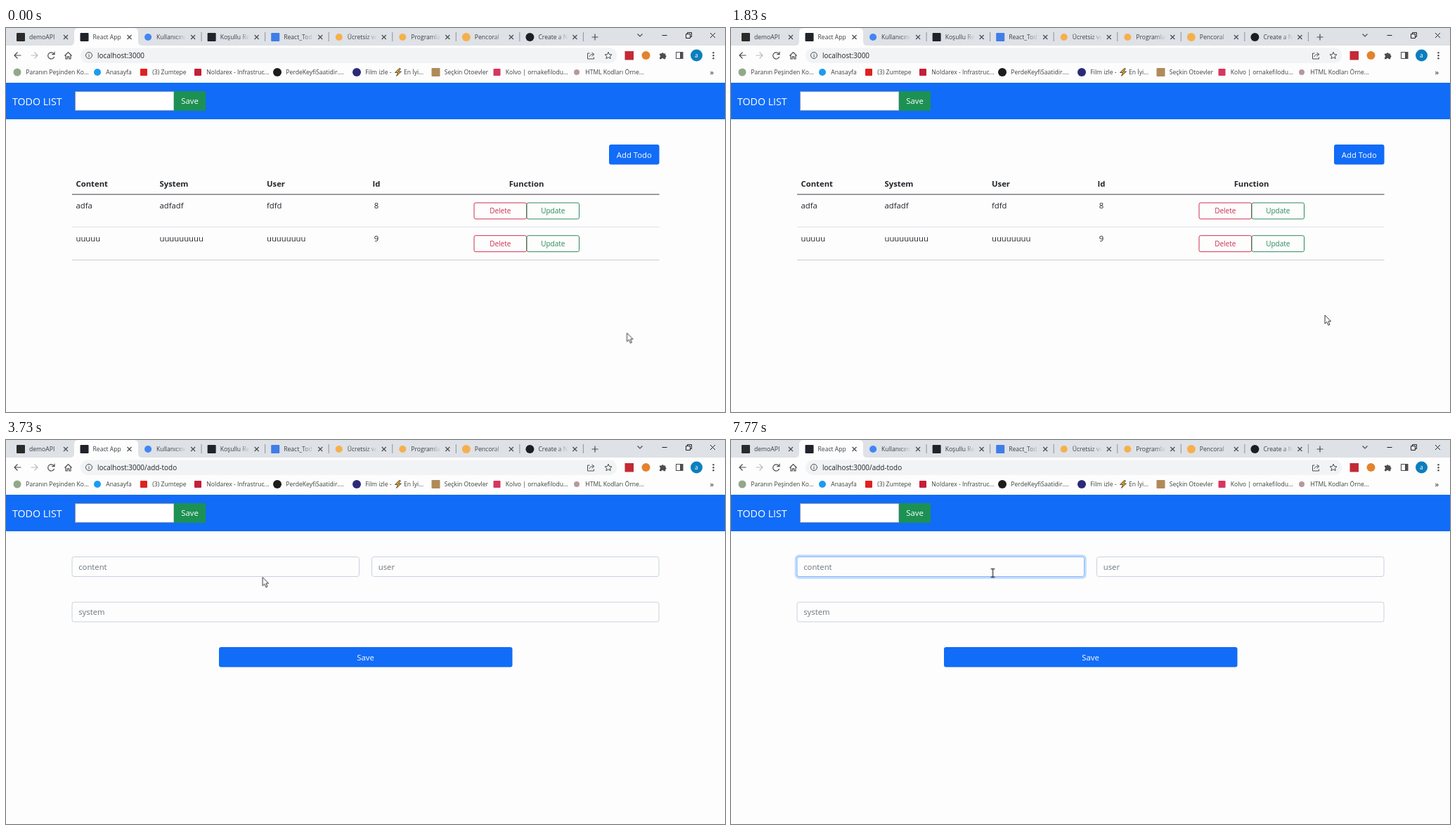
These frames come from a looping animation (1023x547 px, 8000 ms). An HTML page:

```html
<!DOCTYPE html>
<html lang="tr">
<head>
<meta charset="utf-8">
<title>React App</title>
<style>
  html, body { margin: 0; width: 100%; height: 100%; overflow: hidden; background: #fdfdfd; }
  svg { display: block; width: 1023px; height: 547px; font-family: "Open Sans", "Noto Sans", sans-serif; font-size: 11.3px; fill: #212529; }
  .small { font-size: 8.6px; fill: #3c4043; }
  .url { font-size: 9.95px; }
  .line { fill: none; stroke: #4a4d51; stroke-width: 1.2; }
  .mid { text-anchor: middle; }
  .white { fill: #fff; }
  .blue { fill: #116cf8; }
  .bold { font-weight: 700; }
  .field { fill: #fdfdfd; stroke: #c9d1e0; }
  .hint { fill: #6c757d; }
  .btn { font-size: 10px; }

  .loop, .loop * { animation: 8s infinite step-end; }
  #list, #home { animation-name: list; }
  #form, #addUrl { animation-name: form; visibility: hidden; }
  #hover { animation-name: hover; animation-timing-function: linear; opacity: 0; }
  #focus { animation-name: focus; animation-timing-function: ease-in-out; opacity: 0; }
  #caret { animation-name: caret; opacity: 0; }
  #cursor { animation-name: move; animation-timing-function: linear; }
  #arrow { animation-name: arrow; }
  #hand { animation-name: hand; opacity: 0; }
  #beam { animation-name: beam; opacity: 0; }

  @keyframes list { 0% { visibility: visible } 32.5%, 100% { visibility: hidden } }
  @keyframes form { 0% { visibility: hidden } 32.5%, 100% { visibility: visible } }
  @keyframes hover { 0%, 29.375% { opacity: 0 } 31.25%, 100% { opacity: 1 } }
  @keyframes focus { 0%, 51.125% { opacity: 0 } 53%, 100% { opacity: 1 } }
  @keyframes caret {
    0%, 57.5%, 70.5%, 83.375%, 96.75%, 100% { opacity: 0 }
    51.125%, 63.75%, 77.5%, 90% { opacity: 1 }
  }
  @keyframes arrow { 0%, 39.25% { opacity: 1 } 29.375%, 46.75%, 100% { opacity: 0 } }
  @keyframes hand { 0%, 32.5%, 100% { opacity: 0 } 29.375% { opacity: 1 } }
  @keyframes beam { 0%, 39.25% { opacity: 0 } 32.5%, 46.75%, 100% { opacity: 1 } }
  @keyframes move {
    0% { transform: translate(883.5px, 434.5px) }
    12.875%, 18.75% { transform: translate(882.5px, 434.5px) }
    20.5% { transform: translate(882.5px, 440px) }
    22.875% { transform: translate(845px, 409.5px) }
    25% { transform: translate(838px, 330px) }
    27.5% { transform: translate(868px, 225px) }
    30% { transform: translate(894px, 187px) }
    31.5%, 36.625% { transform: translate(897px, 185px) }
    38.75% { transform: translate(860px, 190px) }
    41.25% { transform: translate(700px, 215px) }
    43.75% { transform: translate(480px, 228px) }
    46.625% { transform: translate(365px, 195.5px) }
    48.25%, 100% { transform: translate(372.5px, 189.5px) }
  }
</style>
</head>
<body>
<svg viewBox="0 0 1023 547">
  <defs>
    <linearGradient id="fade">
      <stop offset="0" stop-color="#dee1e6" stop-opacity="0"/>
      <stop offset=".75" stop-color="#dee1e6"/>
    </linearGradient>
  </defs>

  <!-- browser frame -->
  <path fill="#dee1e6" d="M0 0H1023V25H0z"/>
  <path fill="#fdfdfd" d="M0 25H1023V78H0z"/>
  <path fill="#fdfdfd" d="M91 25Q97 25 97 19V6Q97 0 103 0H182Q188 0 188 6V19Q188 25 194 25z"/>
  <g id="tabs"></g>
  <path class="line" d="M833.5 13H842.5M838 8.5V17.5M898.5 8.5L902 12L905.500 8.500"/>
  <path class="line" style="stroke:#222;stroke-width:1" d="M933.500 10.500H940.500M967.500 8.500H973.500V14.500H967.500zM969.500 8V6.500H975.500V12.500H974M1002 7L1009 14M1009 7L1002 14"/>

  <!-- toolbar -->
  <rect x="106" y="28.500" width="763" height="21.500" rx="10.750" fill="#f1f3f4"/>
  <path class="line" d="M21.500 39H12M16.500 34.500L12 39L16.500 43.500M68.200 37A4.600 4.600 0 1 0 68.600 41M69 33.800V37.600H65.200M83.500 39.500L88.500 34.500L93.500 39.500M85 38.500V44H87.300V40.800H89.700V44H92V38.500"/>
  <path class="line" style="stroke:#b9bcc0" d="M35.500 39H45M40.500 34.500L45 39L40.500 43.500"/>
  <g class="line" style="stroke-width:1">
    <circle cx="118" cy="39" r="4.500"/>
    <path d="M118 38.300V41.500M118 36.500V37.500"/>
    <path d="M830.500 36H827.500V44H836.500V41.500M830 41Q830.500 37.500 835.500 37.500M833.500 35L837 37.500L833.500 40.300"/>
    <path d="M857 34.300L858.400 37.600L862 37.900L859.300 40.200L860.100 43.700L857 41.800L853.900 43.700L854.700 40.200L852 37.900L855.600 37.600z"/>
    <rect x="953.500" y="34.500" width="9.500" height="9"/>
  </g>
  <path fill="#4a4d51" d="M959 34.500H963V43.500H959zM930 36.500H932.500A1.700 1.700 0 0 1 935.800 36.500H938.300V38.800A1.700 1.700 0 0 1 938.300 42V44.300H935.700A1.600 1.600 0 0 0 932.600 44.300H930V41.800A1.600 1.600 0 0 0 930 38.800z"/>
  <rect x="880.500" y="33" width="12.500" height="12.500" fill="#c22a35"/>
  <circle cx="910.500" cy="39" r="6" fill="#e5822b"/>
  <circle cx="982.500" cy="39" r="8.500" fill="#0b7fbd"/>
  <text class="small mid" style="fill:#fff" x="982.500" y="42">a</text>
  <g fill="#4a4d51"><circle cx="1006.500" cy="35.200" r="1.200"/><circle cx="1006.500" cy="39.200" r="1.200"/><circle cx="1006.500" cy="43.200" r="1.200"/></g>
  <g class="loop url">
    <text id="home" x="130" y="42.800">localhost:3000</text>
    <text id="addUrl" x="130" y="42.800">localhost:3000/add-todo</text>
  </g>
  <g id="marks"></g>
  <path fill="#e8a021" stroke="#333" stroke-width=".8" d="M559.500 57.500L553.500 63.500H557.500L555.500 68.500L562.500 62H558.500L561.500 58z"/>
  <text x="1001.500" y="66.500">»</text>

  <!-- navigation bar -->
  <path class="blue" d="M0 78H1023V130H0z"/>
  <text class="white" style="font-size:14.2px" x="9" y="109.500">TODO LIST</text>
  <rect class="white" x="98.500" y="90.500" width="140.500" height="27" stroke="#8b98ad"/>
  <path fill="#1d9153" d="M239 90H283Q284 90 284 91V117Q284 118 283 118H239z"/>
  <text class="white mid" x="261.500" y="108.300">Save</text>

  <g class="loop">
    <g id="list">
      <rect class="blue" x="858" y="166" width="71.500" height="28.500" rx="3"/>
      <rect id="hover" fill="#0b5ed7" x="858" y="166" width="71.500" height="28.500" rx="3"/>
      <text class="white mid" x="893.800" y="184.600">Add Todo</text>
      <g class="bold">
        <text x="99.500" y="226.300">Content</text>
        <text x="218.500" y="226.300">System</text>
        <text x="371" y="226.300">User</text>
        <text class="mid" x="527" y="226.300">Id</text>
        <text class="mid" x="740.500" y="226.300">Function</text>
      </g>
      <path stroke="#3a3d48" d="M94 237H929.500"/>
      <path stroke="#dfe3ea" d="M94 283.500H929.500"/>
      <path stroke="#c9ccd2" d="M94 330.500H929.500"/>
      <g id="rows"></g>
    </g>
    <g id="form">
      <rect class="field" x="94" y="166.500" width="408.500" height="28" rx="3"/>
      <g id="focus">
        <rect x="92.250" y="164.750" width="412" height="31.500" rx="4.500" fill="none" stroke="#c2dbfe" stroke-width="3"/>
        <rect x="94" y="166.500" width="408.500" height="28" rx="3" fill="#fdfdfd" stroke="#86b7fe"/>
      </g>
      <rect class="field" x="520.500" y="166.500" width="408.500" height="28" rx="3"/>
      <rect class="field" x="94" y="231" width="835" height="28" rx="3"/>
      <g class="hint">
        <text x="103.200" y="184.800">content</text>
        <text x="529.800" y="184.800">user</text>
        <text x="103.200" y="249.300">system</text>
      </g>
      <path id="caret" stroke="#222" d="M104 174V188"/>
      <rect class="blue" x="303" y="295" width="417.500" height="28.500" rx="3"/>
      <text class="white mid" x="511.500" y="313.800">Save</text>
    </g>
    <g id="cursor" stroke="#222" stroke-width=".9">
      <path id="arrow" class="white" d="M0 0V12.200L2.800 9.600L4.900 14.300L6.900 13.400L4.900 8.800H8.600z"/>
      <path id="hand" class="white" d="M-1 0Q0-1.200 1 0V5Q3 4.400 3.500 5.700Q5.200 5.200 5.800 6.500Q7.800 6.300 7.800 8V11L6.500 15H0L-4 9.500Q-4 7.700-2.500 8.300L-1 9.800z"/>
      <path id="beam" fill="none" stroke-width="1.200" d="M-2.800-5.800H2.800M0-5.800V5.800M-2.800 5.800H2.800"/>
    </g>
  </g>
</svg>
<script>
  const fill = (id, html) => { document.getElementById(id).innerHTML = html; };
  const text = (x, y, s, cls = '') => `<text class="${cls}" x="${x}" y="${y}">${s}</text>`;
  const square = (x, y, r, color) =>
    `<rect x="${x - r}" y="${y - r}" width="${2 * r}" height="${2 * r}" rx="1" fill="${color}"/>`;
  const circle = (x, y, r, color) => `<circle cx="${x}" cy="${y}" r="${r}" fill="${color}"/>`;

  const tabs = [
    ['demoAPI', square, '#2b2b2b', 6],
    ['React App', square, '#20232a', 6],
    ['Kullanıcını', circle, '#4285f4', 5],
    ['Koşullu Re', square, '#20232a', 6],
    ['React_Tod', square, '#3f7de8', 6],
    ['Ücretsiz ve', circle, '#f5b04c', 5],
    ['Programla', circle, '#f5b04c', 5],
    ['Pencoral', circle, '#f5b04c', 6],
    ['Create a N', circle, '#1b1f23', 6],
  ];
  fill('tabs', tabs.map(([name, icon, color, r], i) => {
    const x = i * 90.55;
    const fade = i > 1 ? `<rect x="${x + 60}" y="5" width="20" height="16" fill="url(#fade)"/>` : '';
    const edge = i > 1 ? `<path stroke="#8e9299" d="M${x + 97} 6V19"/>` : '';
    const close = `<path class="line" d="M${x + 82} 10l6 6m0-6l-6 6"/>`;
    return icon(x + 21, 13, r, color) + text(x + 33, 16, name, 'small') + fade + close + edge;
  }).join(''));

  const marks = [
    [16, 'Paranın Peşinden Ko...', circle, '#91a98a', 5.5],
    [130, 'Anasayfa', circle, '#1d9bf0', 5],
    [196, '(3) Zumtepe', square, '#e02020', 5],
    [273, 'Noldarex - Infrastruc...', square, '#c41e3a', 5],
    [386, 'PerdeKeyfiSaatidir....', circle, '#1c1c1c', 6],
    [499, 'Film izle -', circle, '#2c2a78', 6],
    [611.5, 'Seçkin Otoevler', square, '#b08a58', 6],
    [698.5, 'Kolvo | ornakefilodu...', square, '#d6365f', 5],
    [812, 'HTML Kodları Örne...', circle, '#b59a9c', 4],
  ];
  fill('marks', marks.map(([x, name, icon, color, r]) =>
    icon(x, 63, r, color) + text(x + 12.3, 66, name, 'small')).join('') + text(566, 66, 'En İyi...', 'small'));

  const button = (x, y, label, color) =>
    `<rect x="${x}" y="${y}" width="74.5" height="23" rx="2.2" fill="none" stroke="${color}"/>` +
    `<text class="btn mid" style="fill:${color}" x="${x + 37.25}" y="${y + 15.3}">${label}</text>`;
  const rows = [['adfa', 'adfadf', 'fdfd', 8], ['uuuuu', 'uuuuuuuuu', 'uuuuuuuu', 9]];
  fill('rows', rows.map(([content, system, user, id], i) => {
    const y = 257 + i * 46.7;
    return text(99.5, y, content) + text(218.5, y, system) + text(371, y, user) + text(527, y, id, 'mid') +
      button(666, y - 8, 'Delete', '#cf2f4f') + button(741, y - 8, 'Update', '#2a8a5a');
  }).join(''));
</script>
</body>
</html>
```
